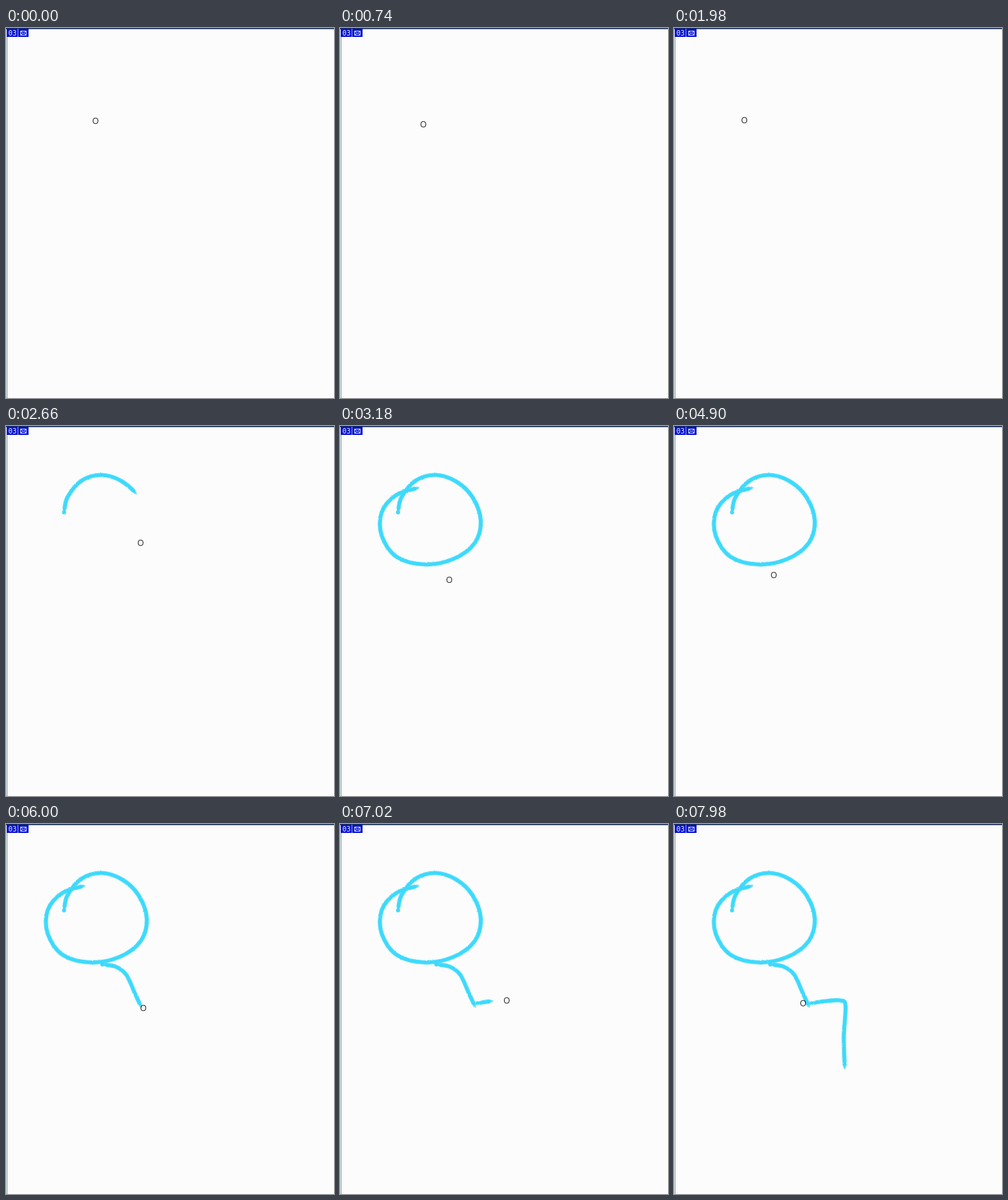
Recreate the animation shown at these times as an HTML page. Size 480 px wide and 540 px high, loop 8 s.

```html
<!DOCTYPE html>
<html lang="en">
<head>
<meta charset="utf-8">
<title>Brush sketch</title>
<style>
  html, body { margin: 0; width: 100%; height: 100%; overflow: hidden; background: #fcfcfc; }
  svg { display: block; width: 100%; height: 100%; }
  .badge { font: 10px "DejaVu Sans Mono", "Liberation Mono", monospace; fill: #e2efff; }
  #ink path { fill: none; stroke: #35d8fc; stroke-linecap: round; stroke-linejoin: round; }
</style>
</head>
<body>
<svg viewBox="0 0 480 540">
  <defs>
    <filter id="grain" filterUnits="userSpaceOnUse" x="0" y="0" width="480" height="540">
      <feTurbulence type="fractalNoise" baseFrequency=".35" numOctaves="2" seed="4"/>
      <feDisplacementMap in="SourceGraphic" scale="2" xChannelSelector="R" yChannelSelector="G"/>
    </filter>
  </defs>
  <rect width="480" height="540" fill="#fcfcfc"/>
  <g shape-rendering="crispEdges">
    <rect x="1" width="1" height="540" fill="#6d929f"/>
    <rect width="480" height="1" fill="#172c55"/>
    <rect y="1" width="480" height="1" fill="#71809c"/>
    <rect x="1" y="1" width="32" height="12" fill="#0610cf"/>
    <rect x="17" y="1" width="1" height="12" fill="#8ea4e8"/>
  </g>
  <text class="badge" x="3.5" y="11">03</text>
  <g fill="none" stroke="#e2efff" stroke-width=".9">
    <rect x="21.5" y="4.5" width="8" height="6"/>
    <path d="M22 5l3.5 3L29 5M22 10l2.5-2.5M29 10l-2.5-2.5"/>
  </g>
  <g id="ink" filter="url(#grain)"></g>
  <rect id="cursor" x="-3.5" y="-4" width="7" height="8" rx="3" fill="none" stroke="#000"/>
</svg>
<script>
const LOOP = 8000;
const LAG = 50; // the smoothed ink trails the cursor
const LAYERS = [ // together they taper both ends
  { width: 2.6, inset: 0, opacity: .55 },
  { width: 4.6, inset: 3, opacity: .6 },
  { width: 6.2, inset: 6.5, opacity: .82 }
];
const ink = document.getElementById('ink');
const cursor = document.getElementById('cursor');
const clamp = (v, lo, hi) => Math.max(lo, Math.min(hi, v));

function group(list, n) {
  const out = [];
  for (let i = 0; i < list.length; i += n) out.push(list.slice(i, i + n));
  return out;
}

// Smooth path through points
function curve(list) {
  const p = group(list, 2);
  const at = i => p[clamp(i, 0, p.length - 1)];
  let d = `M${p[0]}`;
  for (let i = 0; i < p.length - 1; i++) {
    const [a, b, c, e] = [at(i - 1), at(i), at(i + 1), at(i + 2)];
    const c1 = b.map((v, k) => v + (c[k] - a[k]) / 6);
    const c2 = c.map((v, k) => v - (e[k] - b[k]) / 6);
    d += `C${c1} ${c2} ${c}`;
  }
  return d;
}

function makeStroke(start, end, points) {
  const d = curve(points);
  const layers = LAYERS.map(({ width, inset, opacity }) => {
    const path = document.createElementNS('http://www.w3.org/2000/svg', 'path');
    path.setAttribute('d', d);
    path.setAttribute('stroke-width', width);
    path.setAttribute('opacity', opacity);
    ink.append(path);
    return { path, inset };
  });
  return { start, end, layers, length: layers[0].path.getTotalLength() };
}

const head = makeStroke(2490, 2860, [
  85, 126, 90, 104, 111, 79.5, 140, 71.5, 170, 81, 194, 104, 206, 138, 197, 171,
  166, 194, 124, 202, 83, 191, 61, 160, 61, 126, 82, 101, 115, 90]);
const neck = makeStroke(5480, 5930, [
  141, 205, 160, 208, 176, 220, 189, 248, 198, 267]);
const arm = makeStroke(6900, 7270, [
  201, 261.5, 222, 258.5, 243, 257.5, 251, 265, 248.5, 310, 250, 357]);
const strokes = [head, neck, arm];

// Hovering between strokes: time, x, y
const beforeHead = group([
  0, 131, 135.5, 200, 139, 150, 560, 107, 180, 740, 122, 140, 1150, 245, 160,
  1300, 200, 201, 1660, 115, 124, 1980, 103, 134, 2120, 112, 146,
  2400, 82, 122, 2490, 85, 126], 3);
const beforeNeck = group([
  2860, 115, 90, 3060, 150, 150, 3240, 162, 243, 3500, 127, 226, 3840, 199, 218,
  3960, 207, 222, 4500, 155, 222, 4960, 146, 217, 5260, 146, 217,
  5400, 134, 201, 5480, 141, 205], 3);
const beforeArm = group([
  5930, 198, 267, 6000, 201, 268, 6200, 212, 277, 6400, 219, 268,
  6600, 197, 258, 6800, 201, 261.5], 3);
const afterArm = group([
  7270, 250, 357, 7310, 250, 367, 7540, 141, 208, 7720, 193, 269,
  7860, 191, 255, 7980, 189, 261.5], 3);

// Monotone interpolation: smooth, without overshoot
function track(keys, time, k) {
  const last = keys.length - 2;
  const t = Math.min(time, keys[last + 1][0]);
  let i = 0;
  while (i < last && t >= keys[i + 1][0]) i++;
  const slope = j => j < 0 || j > last ? 0 :
    (keys[j + 1][k] - keys[j][k]) / (keys[j + 1][0] - keys[j][0]);
  const tangent = j => {
    const a = slope(j - 1), b = slope(j);
    return a * b > 0 ? 2 * a * b / (a + b) : 0;
  };
  const span = keys[i + 1][0] - keys[i][0];
  const u = (t - keys[i][0]) / span;
  const v = 1 - u;
  return keys[i][k] * v * v * (1 + 2 * u) + keys[i + 1][k] * u * u * (3 - 2 * u)
    + span * u * v * (v * tangent(i) - u * tangent(i + 1));
}

function progress(stroke, t) {
  const u = clamp((t - stroke.start) / (stroke.end - stroke.start), 0, 1);
  return .6 * u + .4 * u * u * (3 - 2 * u);
}

function cursorAt(t) {
  const active = strokes.find(s => t >= s.start && t < s.end);
  if (active) {
    const p = active.layers[0].path.getPointAtLength(progress(active, t) * active.length);
    return [p.x, p.y];
  }
  const keys = t < head.start ? beforeHead : t < neck.start ? beforeNeck
    : t < arm.start ? beforeArm : afterArm;
  return [track(keys, t, 1), track(keys, t, 2)];
}

function render(t) {
  for (const s of strokes) {
    const drawn = progress(s, t - LAG) * s.length;
    for (const { path, inset } of s.layers) {
      const size = Math.max(0, drawn - 2 * inset);
      path.style.display = size > 0 ? '' : 'none';
      path.setAttribute('stroke-dasharray', `0 ${inset} ${size} ${s.length * 2}`);
    }
  }
  const [x, y] = cursorAt(t);
  cursor.setAttribute('transform', `translate(${Math.round(x)} ${Math.floor(y) + .5})`);
}

const origin = performance.now();
function tick() {
  render((performance.now() - origin) % LOOP);
  requestAnimationFrame(tick);
}
tick();
</script>
</body>
</html>
```
